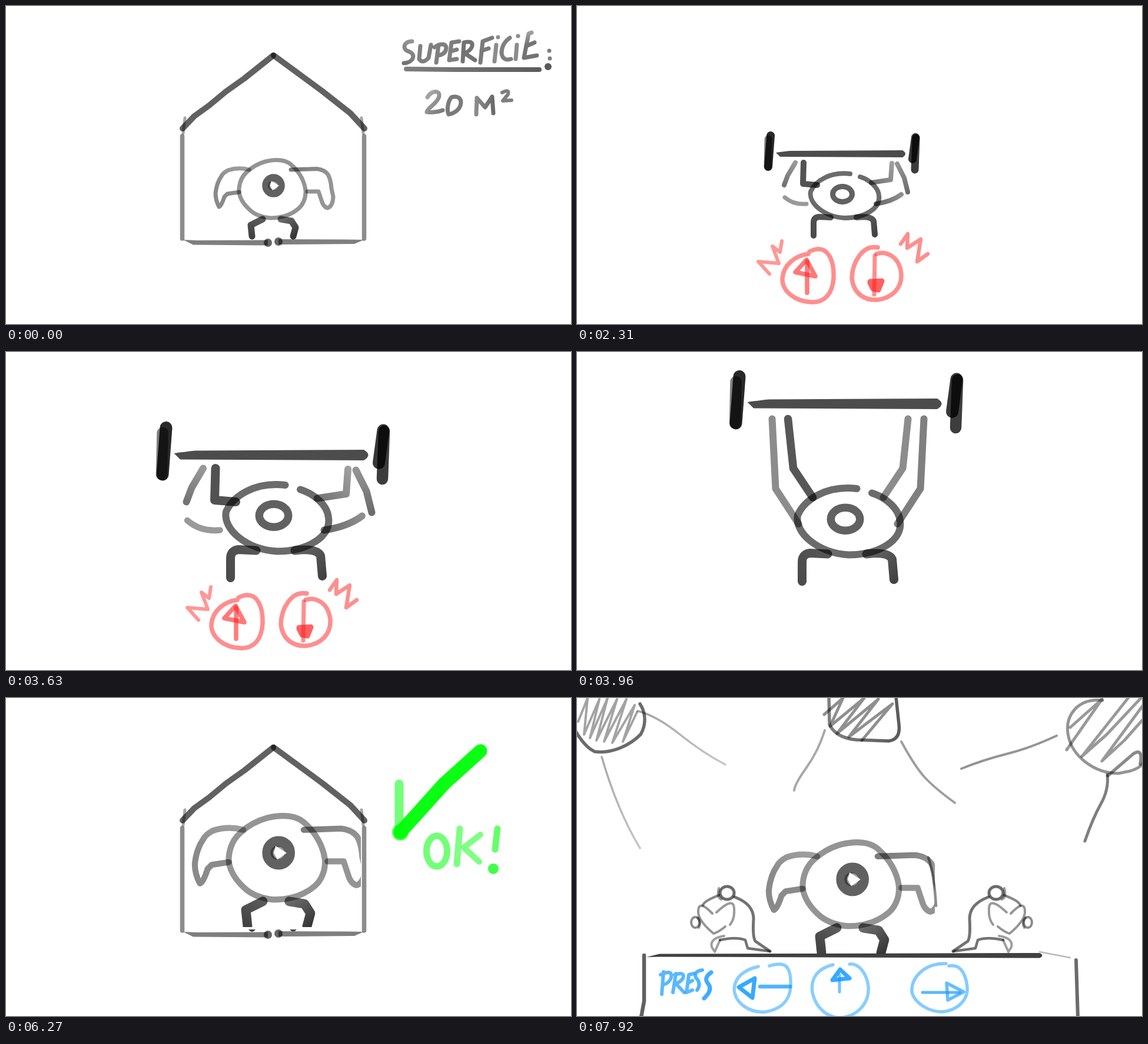
Animation, 960 px wide and 540 px high, one loop 8 s. Source, as an HTML page:

```html
<!DOCTYPE html>
<html lang="en">
<head>
<meta charset="utf-8">
<title>Sketch storyboard</title>
<style>
html, body { margin: 0; width: 100%; height: 100%; overflow: hidden; background: #fff; }
svg { display: block; width: 100vw; height: 100vh; }
</style>
</head>
<body>
<svg id="stage" viewBox="0 0 960 540" fill="none" stroke-linecap="round" stroke-linejoin="round"></svg>
<script>
const LOOP = 8000;
const INK = '0,0,0', RED = '255,30,30', GREEN = '0,255,10', BLUE = '20,155,255';
let defs = '', gradients = 0;

// Brush stroke; a second alpha fades the ink from the first to the last point.
function brush(d, w, a, b, rgb = INK) {
  let paint = `rgba(${rgb},${a})`;
  if (b !== undefined) {
    const n = d.match(/-?[\d.]+/g), id = 'ink' + gradients++;
    const [x2, y2] = n.slice(-2);
    defs += `<linearGradient id="${id}" gradientUnits="userSpaceOnUse" x1="${n[0]}" y1="${n[1]}" x2="${x2}" y2="${y2}">
      <stop stop-color="rgb(${rgb})" stop-opacity="${a}"/>
      <stop offset="1" stop-color="rgb(${rgb})" stop-opacity="${b}"/></linearGradient>`;
    paint = `url(#${id})`;
  }
  return `<path d="${d}" stroke="${paint}" stroke-width="${w}"/>`;
}
const tint = rgb => (d, w, a) => brush(d, w, a, undefined, rgb);
const red = tint(RED), green = tint(GREEN), blue = tint(BLUE);
const blot = (d, a) => `<path d="${d}" fill="rgba(${INK},${a})"/>`;
const dot = (x, y, r, a, rgb = INK) => `<circle cx="${x}" cy="${y}" r="${r}" fill="rgba(${rgb},${a})"/>`;
const ring = (x, y, rx, ry, w, a, rgb = INK) =>
  `<ellipse cx="${x}" cy="${y}" rx="${rx}" ry="${ry}" stroke="rgba(${rgb},${a})" stroke-width="${w}"/>`;
const move = (s, t) => `<g transform="${t}">${s}</g>`;
const group = (id, s) => `<g id="${id}" visibility="hidden">${s}</g>`;

const house =
  brush('M300 208L320 187L345 169L374 145L405 123L454 84', 10, .62) +
  brush('M455 84L500 117L538 145L585 182L609 208', 10, .62) +
  brush('M299.5 221V395', 7.5, .45) + brush('M301 216L304 190', 5, .35) +
  brush('M608.5 221V395', 7.5, .45) + brush('M607 216L604 190', 5, .35) +
  blot('M301 397L325 398L445 397.5V406.5L318 405.5Z', .5) + dot(445, 402, 7, .6) +
  blot('M608 397L580 396.5L463 396V405L592 404Z', .5) + dot(463, 400, 7, .6);

const creature =
  brush('M441 264C461 259 476 262 484 269C498 281 507 297 509 313C510 328 503 339 497 344C483 356 466 360 449 360C434 359 421 353 414 346C402 335 395 322 396 310C397 297 402 288 410 281C420 272 430 267 441 264', 7, .42) +
  brush('M413 278Q395 273 377 279Q368 284 366 289Q358 300 356 318Q356 330 362 341Q366 340 371 324L376 319L396 316', 7, .38, .46) +
  brush('M484 278L528 276.5Q541 278 547 286Q552 295 553 310L556 324Q555 341 546 343Q539 341 536 330L531 315L512 315', 7, .52, .42) +
  ring(454.5, 305, 13, 13.5, 12.5, .62) +
  dot(453, 305, 8, .38) +
  '<path d="M451 297L464 305L453 313L449 305Z" fill="#fff"/>' +
  brush('M436 362L416 372L418 391', 11, .64, .74) +
  brush('M467 362L485 365L492 376L488 391', 11, .58, .78);
const grown = move(creature, 'translate(-193.6 -177.8) scale(1.445)');

const title =
  brush('M690 60C675 60 673 74 684 77C698 82 692 96 676 97', 7, .42, .55) +
  brush('M704 68L702 90Q708 99 718 88L722 66', 7, .5) +
  brush('M735 66L731 96M728 70Q745 60 748 70Q748 82 734 84', 7, .5) +
  brush('M770 60L757 62L753 92L766 90M755 77L766 74', 7, .5) +
  brush('M776 94L778 62Q794 58 792 68Q790 76 779 80L797 92', 7, .55) +
  brush('M806 96L810 60L826 54M808 76L820 72', 7, .52) +
  brush('M833 66L830 94M836 53V53', 7, .45) +
  brush('M856 54Q842 64 842 80Q844 94 858 90', 7, .5) +
  brush('M868 66L866 90M870 51V51', 7, .45) +
  brush('M893 45L888 47L880 88L902 84M884 68L898 62', 7, .38, .55) +
  brush('M680 107L760 108L906 108', 8, .5, .64) +
  dot(923, 76, 3.5, .5) + dot(924, 89, 3.5, .5) + dot(921, 103, 6, .65) +
  brush('M716 155C725 140 742 144 734 158C728 168 716 174 715 180Q728 182 742 177', 7, .36, .52) +
  brush('M757 155C780 148 778 180 752 184C748 175 752 160 757 155', 7, .52) +
  brush('M799 184L800 156L814 172L826 154L828 182', 7, .45, .58) +
  brush('M843 147Q856 140 853 150L844 161L859 160', 6, .5);

const torso =
  brush('M464 285C430 281 405 297 397 315C393 335 420 358 455 360C490 360 516 343 513 322C512 308 497 295 481 290', 8, .58) +
  ring(451, 319.5, 16.5, 13, 9, .62) +
  brush('M431 359L411 358Q402 359 402 368V390', 10, .66, .74) +
  brush('M475 359Q500 356 504 365L506 388', 10, .6, .74);
const barbell =
  blot('M338 249Q352 247 362 246L553 245Q563 251 553 257L345 256Z', .7) +
  brush('M329 220L325 273', 14, .84) + brush('M325 226L324 273', 13, .5) +
  brush('M575 223L570 260', 14, .78) + brush('M576 224L574 278', 13, .76);
const bent =
  brush('M371 266L358 288L352 304', 8, .4, .55) +
  brush('M385 266L384 302L408 304', 10, .68) +
  brush('M353 325Q368 338 390 336', 7, .4) +
  brush('M535 267L533 295L500 300', 8, .38, .55) +
  brush('M544 268L556 292L562 316', 8, .42, .58) +
  brush('M551 320Q535 332 508 336', 8, .44, .6);
const straight =
  brush('M368 206L372 285L398 325', 8, .45) + brush('M386 206L392 262L414 295', 9, .66) +
  brush('M540 206L536 285L510 325', 8, .5) + brush('M522 206L516 262L494 295', 8, .45);
const down = torso + barbell + bent;
const up = torso + move(barbell, 'translate(2 -62)') + straight;

const buttons =
  red('M395 417C425 402 437 430 436 462C434 490 420 503 400 503C370 502 348 484 349 462C351 440 370 424 393 421', 7.5, .5) +
  red('M390 431L371 452L405 459Z', 7.5, .6) + red('M391 434V487', 7.5, .58) +
  red('M511 410C485 405 468 435 467 462C470 490 490 500 510 499C535 496 552 480 551 455C548 425 525 415 509 421', 7.5, .5) +
  red('M506 424L505 490', 7, .5) + red('M498 468L518 467L512 482L503 480L498 470L510 473', 9, .7) +
  red('M327 455L308 434L343 437L332 408L345 418L348 399', 6, .46) +
  red('M550 404L562 387L561 411L584 396L578 434L596 421', 6.5, .5);

const approval =
  green('M668 146L668 228', 15, .55) + green('M670 228L700 195L745 145L806 90', 23, .96) +
  dot(670, 228, 14, .7, GREEN) +
  ring(732, 260, 17.5, 26, 11, .55, GREEN) +
  green('M771 222L766 282', 11, .5) + green('M806 232L778 254L804 278', 10, .5) +
  green('M835 222L831 257', 11, .6) + dot(828, 290, 9, .75, GREEN);

const speed = [[115, 0, 960, 5], [161, 0, 960, 5], [183, 0, 960, 4.5], [217, 557, 960, 4.5],
  [253, 0, 960, 5.5], [305, 0, 960, 5], [351, 0, 505, 4], [365, 10, 960, 5.5], [393, 8, 960, 5],
  [419, 0, 320, 5.5], [439, 740, 960, 5], [454, 0, 960, 5]];
const streak = ([y, a, b, w]) => {
  const r = w / 2, end = b < 960 ? `${b - 90} ${y - r}L${b} ${y - 1}V${y + 1}L${b - 90} ${y + r}` : `960 ${y - r}V${y + r}`;
  return `<path d="M${a} ${y - 1}L${a + 90} ${y - r}L${end}H${a + 90}L${a} ${y + 1}Z" fill="#868686"/>`;
};
const rush = '<path d="M0 0H960V540H0Z" fill="#fff"/>' +
  brush('M3 99Q8 103 14 103L320 103', 4, .44) +
  '<path d="M310 101L405 102.5V103.5L310 105Z" fill="#999"/>' +
  speed.map(streak).join('') +
  '<path d="M0 0H960V93H0ZM0 455H960V540H0Z" fill="#000"/>';

const helper =
  ring(255, 331, 12, 11, 5, .58) + brush('M241 323Q237 338 245 342', 4, .4) +
  brush('M268 338Q300 350 300 375Q298 405 303 413L328 430', 5, .55) +
  brush('M241 335Q215 345 214 352', 4.5, .48) +
  brush('M230 366Q205 340 206 365Q208 380 232 400Q240 398 252 388', 4, .42) +
  brush('M237 364Q268 335 267 360Q268 375 260 385', 4, .4) +
  ring(201, 381, 7, 9, 4, .45) + brush('M205 373Q212 382 207 390', 4, .4) +
  brush('M250 404Q225 408 229 423L234 431L243 411', 4, .38) +
  brush('M243 411Q270 405 286 411L290 425L327 430', 4.5, .55);

const lamps =
  brush('M-2 57Q14 84 30 91C60 95 90 80 108 62C118 45 117 25 107 10', 5.5, .58) +
  brush('M2 40L18 0L12 62L38 2L22 68L52 0L33 72L68 2L46 74L84 2L60 76L98 12L78 74L102 24', 4, .36) +
  brush('M42 100Q68 190 107 255', 3.5, .34, .22) +
  brush('M103 22Q135 30 175 62T252 113', 3.5, .36, .22) +
  brush('M428 -2L429 45Q440 68 475 71L530 73Q550 70 547 45L542 -2', 5.5, .5, .64) +
  brush('M420 28L452 0L430 48L488 0L442 60L512 2L462 66L536 10L484 72', 5, .44) +
  brush('M421 55Q410 90 390 118T369 157', 4, .34) +
  brush('M551 74Q575 118 592 136T642 178', 4, .38) +
  brush('M893 4C850 0 830 30 834 60C840 100 880 128 920 128L940 124Q958 118 962 110', 5, .42) +
  brush('M832 88L892 2L838 50M858 99L938 -2M858 99L900 62L962 -4M892 107L962 12M892 107L930 72L962 36', 5, .4) +
  brush('M902 132L945 95Q962 84 957 112', 5.5, .46) +
  brush('M653 120Q690 105 730 95T815 64', 4, .42) +
  brush('M901 130Q904 155 890 180T863 243', 5, .5);

const prompt =
  blue('M147 465L144 503M142 470Q163 460 160 475Q156 485 146 487', 6, .7) +
  blue('M168 468L163 500M166 470Q184 464 180 476Q176 482 168 485L182 500', 6, .7) +
  blue('M198 468L190 470L186 500L196 496M188 484L196 480', 6, .7) +
  blue('M213 462Q198 464 202 475Q212 485 204 496', 6, .74) +
  blue('M228 466Q215 475 222 484Q232 495 216 510', 7, .82) +
  blue('M308 456Q270 465 267 493C268 520 295 535 320 533C350 528 365 510 363 480Q362 452 345 452Q335 452 327 455', 5.5, .5) +
  blue('M275 491L302 476L298 509Z', 7, .85) + blue('M311 490H362', 6.5, .75) +
  blue('M435 453C405 460 397 480 400 500C405 525 425 543 447 543C480 540 497 515 495 490C493 470 480 450 463 452', 5.5, .5) +
  blue('M434 479L447 461L463 476Z', 7, .85) + blue('M446 470V499', 5, .6) +
  blue('M627 451C590 450 567 475 569 500C575 520 600 533 620 533C650 530 665 510 663 490C660 465 650 452 632 455', 5.5, .52) +
  blue('M587 500H650', 5, .7) + blue('M628 484L657 499L630 513Z', 5.5, .65);

const show = lamps + helper + move(helper, 'translate(967 0) scale(-1 1)') +
  move(`<g clip-path="url(#room)">${grown}</g>`, 'translate(5 45)') +
  brush('M597 271Q607 300 610 353', 4.5, .45) +
  blot('M118 440L140 434.5L786 433Q795 437 786 441.5L140 439.5Z', .75) +
  brush('M786 431L838 441', 2.5, .28) +
  brush('M114 437V515L109 542', 6.5, .62) + brush('M848 445L851 542', 6, .58) + prompt;

const crumbs = '<path d="M412 393Q418 401 424 393ZM482 393Q488 400 494 393Z" fill="#444"/>';

const parts = {
  house, title, creature, buttons, approval, rush, show,
  grown: `<g clip-path="url(#floor)">${grown}</g>`,
  inside: `<g clip-path="url(#room)">${grown}</g>` + crumbs,
  down1: down, up1: up,
  down2: move(down, 'translate(-121.6 -101.8) scale(1.27 1.25)'),
  up2: move(up, 'translate(-121.6 -98.8) scale(1.27 1.25)'),
  down3: move(down, 'translate(-221.5 -201.5) scale(1.5)'),
  up3: move(up, 'translate(-220.5 -195.5) scale(1.5)')
};

// Start time, house opacity, visible parts.
const scenes = [
  [0, 1, 'house title creature'],
  [990, .5, 'house creature'],
  [1650, 1, 'creature'],
  [2310, 1, 'down1 buttons'],
  [2640, 1, 'up1 buttons'],
  [2970, 1, 'down2 buttons'],
  [3300, 1, 'up2 buttons'],
  [3630, 1, 'down3 buttons'],
  [3960, 1, 'up3'],
  [4950, 1, 'grown'],
  [5610, .5, 'house inside'],
  [5940, 1, 'house inside'],
  [6270, 1, 'house inside approval'],
  [7590, 1, 'rush'],
  [7920, 1, 'show']
];

const svg = document.getElementById('stage');
const body = Object.entries(parts).map(([id, s]) => group(id, s)).join('');
svg.innerHTML = `<defs>${defs}
  <clipPath id="floor"><path d="M0 0H960V389H0Z"/></clipPath>
  <clipPath id="room"><path d="M0 0H603V389H0Z"/></clipPath></defs>` + body;
const nodes = Object.keys(parts).map(id => svg.querySelector('#' + id));

function draw(t) {
  const [, fade, names] = scenes.filter(s => s[0] <= t).pop();
  const shown = names.split(' ');
  for (const n of nodes) n.setAttribute('visibility', shown.includes(n.id) ? 'visible' : 'hidden');
  nodes[0].setAttribute('opacity', fade);
}
const start = performance.now();
function tick() {
  draw((performance.now() - start) % LOOP);
  requestAnimationFrame(tick);
}
draw(0);
requestAnimationFrame(tick);
</script>
</body>
</html>
```
